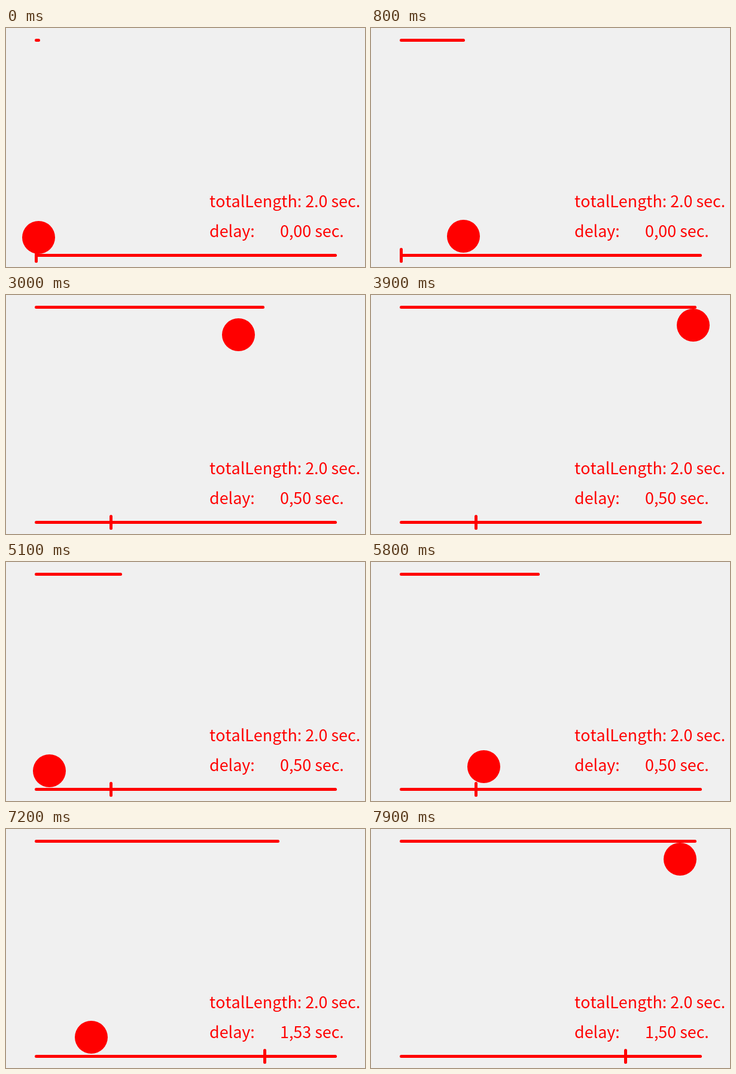
An HTML page with a canvas for the animation above (8 s loop, 600 by 400 pixels).

```html
<!DOCTYPE html>
<html lang="en">
<head>
<meta charset="utf-8">
<title>Delay demo</title>
<style>
  html, body { margin: 0; width: 100%; height: 100%; overflow: hidden; background: #f0f0f0; }
  canvas { display: block; }
</style>
</head>
<body>
<canvas id="stage" width="600" height="400"></canvas>
<script>
const ctx = document.getElementById('stage').getContext('2d');
const LOOP = 8000, STEP = 100;
const CYCLE = 4000, LEAD = 33.6;   // one sweep, and its head start in ms
const TOTAL = 2;                   // seconds shown for a full sweep
const LEFT = 50, SPAN = 500;
const RED = '#f00';
const FONT = '26.86px "Noto Sans CJK JP", "Noto Sans CJK SC", "Noto Sans CJK", "Source Sans Pro", "Noto Sans", sans-serif';

// slider drags: [start ms, end ms, from, to] in seconds of delay
const DRAGS = [
  [2100, 3000, 0, 0.5],
  [6400, 6950, 0.5, 1.53],
  [7200, 7400, 1.53, 1.5]
];

const clamp = v => Math.min(1, Math.max(0, v));
const smooth = u => u * u * (3 - 2 * u);
const quintInOut = u => u < 0.5 ? 16 * u ** 5 : 1 - 16 * (1 - u) ** 5;
const snap = v => Math.floor(Math.fround(v)) + 0.5;

function delayAt(t) {
  let delay = 0;
  for (const [start, end, from, to] of DRAGS) {
    if (t >= start) delay = from + (to - from) * smooth(clamp((t - start) / (end - start)));
  }
  return delay;
}

function line(x1, y1, x2, y2) {
  ctx.beginPath();
  ctx.moveTo(snap(x1), snap(y1));
  ctx.lineTo(snap(x2), snap(y2));
  ctx.stroke();
}

function draw(t) {
  const delay = delayAt(t);
  const share = delay / TOTAL;
  const sweep = ((t + LEAD) % CYCLE) / CYCLE;
  const move = clamp((sweep - share) / (1 - share));
  const tick = LEFT + SPAN * share;

  ctx.fillStyle = '#f0f0f0';
  ctx.fillRect(0, 0, 600, 400);

  ctx.strokeStyle = ctx.fillStyle = RED;
  ctx.lineWidth = 5;
  ctx.lineCap = 'round';
  line(LEFT, 20, LEFT + SPAN * sweep, 20);
  line(LEFT, 380, LEFT + SPAN, 380);
  line(tick, 370, tick, 390);

  ctx.beginPath();
  ctx.arc(snap(LEFT + SPAN * move), snap(350 - 300 * quintInOut(move)), 27.5, 0, Math.PI * 2);
  ctx.fill();

  ctx.font = FONT;
  ctx.fontKerning = 'none';
  ctx.fillText('totalLength: 2.0 sec.', 340, 300);
  ctx.fillText('delay:', 340, 350);
  ctx.fillText(delay.toFixed(2).replace('.', ',') + ' sec.', 458, 350);
}

function frame() {
  const t = performance.now() % LOOP;
  draw(Math.floor(t / STEP) * STEP);
  requestAnimationFrame(frame);
}
frame();
</script>
</body>
</html>
```
